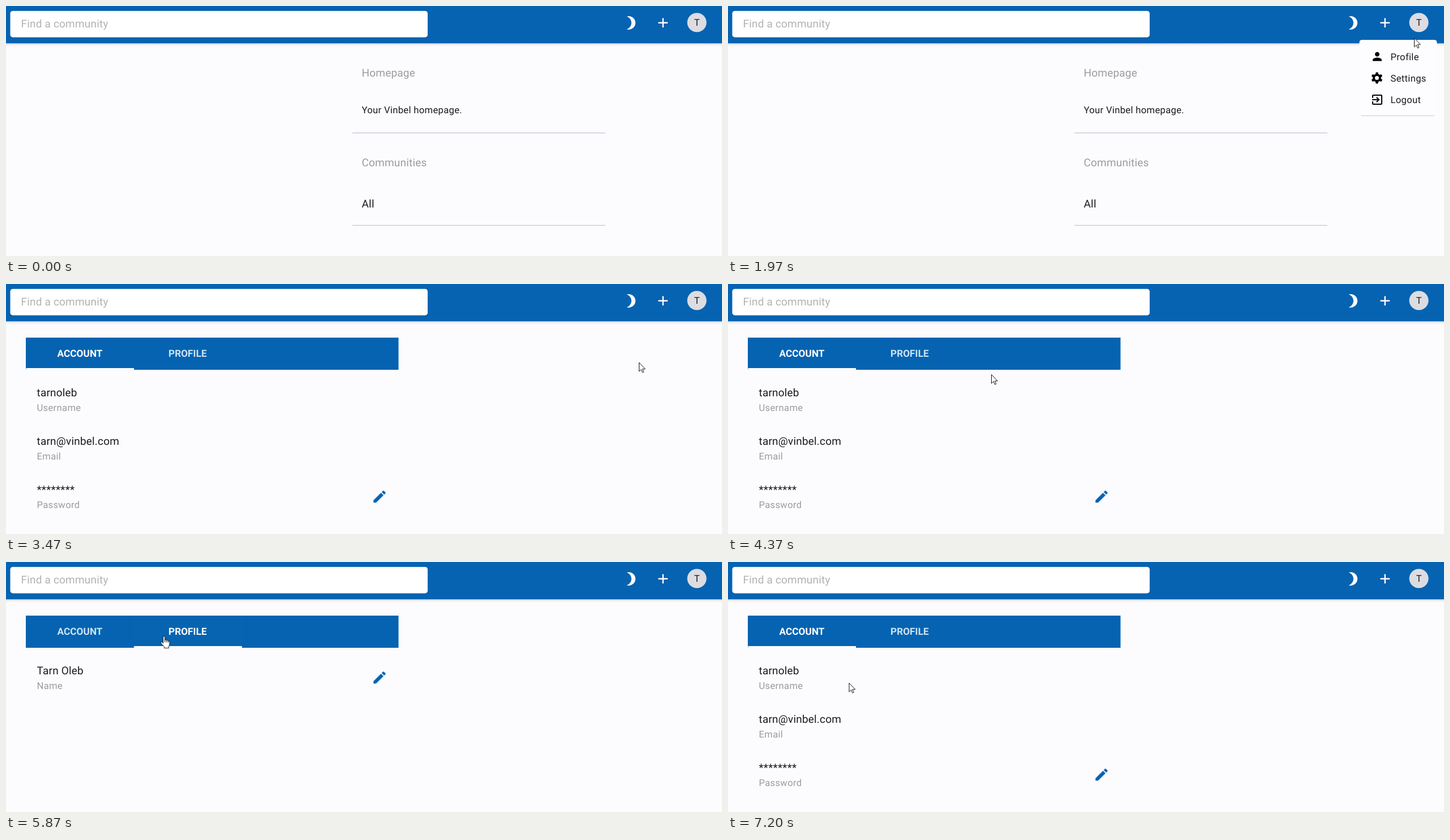
Write an HTML page that moves like this. It is 1265x443 px and loops after 7.23 s.

```html
<!DOCTYPE html>
<html lang="en">
<head>
<meta charset="utf-8">
<title>Account settings</title>
<style>
html, body { margin: 0; width: 100%; height: 100%; overflow: hidden; background: #fcfcff; }
svg { display: block; }
#stage { width: 1265px; height: 443px; }
text { font-family: Roboto, Arial, sans-serif; text-rendering: geometricPrecision; fill: #1c1c1c; }
.big { font-size: 19.05px; letter-spacing: .00938em; }
.small { font-size: 16.66px; letter-spacing: .01786em; }
.tab { font-size: 17.3px; font-weight: 600; fill: #fff; }
.dim { fill: #9c9c9a; }
.hint { fill: #b2b2ae; }
.off { fill: #cbe4f4; }
.blue { fill: #0563b1; }
.line { fill: #cbc9d8; }
.move { animation: 7230ms linear infinite; }
.step { animation: 7230ms step-end infinite; }

#home { animation-name: home; }
#settings { animation-name: settings; }
.account { animation-name: account; }
#profile { animation-name: profile; }
@keyframes home { 0% { visibility: visible } 43.15%, 100% { visibility: hidden } }
@keyframes settings { 0% { visibility: hidden } 43.15%, 100% { visibility: visible } }
@keyframes account {
  0% { visibility: hidden } 43.15% { visibility: visible }
  73.93% { visibility: hidden } 89.63%, 100% { visibility: visible }
}
@keyframes profile {
  0% { visibility: hidden } 73.93% { visibility: visible } 89.63%, 100% { visibility: hidden }
}

#menu { animation-name: menu; transform-origin: 1220px 60px; }
@keyframes menu {
  0%, 19.4% { opacity: 0; transform: scale(.75, .56); animation-timing-function: cubic-bezier(.4,0,.2,1) }
  22.6%, 43.14% { opacity: 1; transform: none }
  43.15%, 100% { opacity: 0; transform: none }
}

#bar { animation-name: bar; }
@keyframes bar {
  0%, 73.93% { transform: none; animation-timing-function: cubic-bezier(.4,0,.2,1) }
  78.08%, 89.95% { transform: translateX(190.7px); animation-timing-function: cubic-bezier(.4,0,.2,1) }
  94.1%, 100% { transform: none }
}

.ripple { fill: #fff; opacity: 0; }
#r1 { animation-name: grow1, fade1; transform-origin: 318px 130px; }
#r2 { animation-name: grow2, fade2; transform-origin: 170px 131px; }
@keyframes grow1 {
  0%, 73.3% { transform: scale(0); animation-timing-function: cubic-bezier(.4,0,.2,1) }
  80.9%, 100% { transform: none }
}
@keyframes fade1 {
  0%, 73.3% { opacity: .14 } 75.5% { opacity: .17 } 81.5%, 100% { opacity: 0 }
}
@keyframes grow2 {
  0%, 88.4% { transform: scale(0); animation-timing-function: cubic-bezier(.4,0,.2,1) }
  96%, 100% { transform: none }
}
@keyframes fade2 {
  0%, 88.4% { opacity: .14 } 90.6% { opacity: .17 } 97%, 100% { opacity: 0 }
}

#cursor { animation-name: path; animation-timing-function: ease-in-out; }
@keyframes path {
  0%, 2.5% { transform: translate(985px, 450px); animation-timing-function: ease-in }
  10.5% { transform: translate(1110px, 260px); animation-timing-function: ease-out }
  16.18% { transform: translate(1208px, 45px) }
  18.7%, 23.5% { transform: translate(1215px, 35px) }
  35.3%, 44.5% { transform: translate(1201px, 136px) }
  59.5%, 61.3% { transform: translate(465px, 160px) }
  71.2%, 77.5% { transform: translate(325px, 131px) }
  87.1%, 91.3% { transform: translate(177px, 132px) }
  98.9%, 100% { transform: translate(213.5px, 214px) }
}
#arrow { animation-name: arrow; }
#hand { animation-name: hand; }
@keyframes arrow {
  0% { visibility: visible } 15.4% { visibility: hidden }
  22% { visibility: visible } 28.5% { visibility: hidden }
  43.8% { visibility: visible } 66.5% { visibility: hidden }
  93.6%, 100% { visibility: visible }
}
@keyframes hand {
  0% { visibility: hidden } 15.4% { visibility: visible }
  22% { visibility: hidden } 28.5% { visibility: visible }
  43.8% { visibility: hidden } 66.5% { visibility: visible }
  93.6%, 100% { visibility: hidden }
}
</style>
</head>
<body>
<svg id="stage" viewBox="0 0 1265 443" xmlns="http://www.w3.org/2000/svg">
  <defs>
    <linearGradient id="shade" x1="0" y1="0" x2="0" y2="1">
      <stop offset="0" stop-color="#8088a8" stop-opacity=".5"/>
      <stop offset=".4" stop-color="#b0b0b8" stop-opacity=".2"/>
      <stop offset="1" stop-color="#c8c8c0" stop-opacity="0"/>
    </linearGradient>
    <clipPath id="tab1"><rect x="35" y="95" width="191" height="57"/></clipPath>
    <clipPath id="tab2"><rect x="226" y="95" width="191" height="57"/></clipPath>
    <path id="pen" d="M3 17.25V21h3.75L17.81 9.94l-3.75-3.75L3 17.25zM20.71 7.04c.39-.39.39-1.02 0-1.41l-2.34-2.34c-.39-.39-1.02-.39-1.41 0l-1.83 1.83 3.75 3.75 1.83-1.83z"/>
    <path id="tooth" d="M9.3 6L10 2.4q.1-.4.5-.4h3q.4 0 .5.4l.7 3.6z"/>
  </defs>

  <rect width="1265" height="443" fill="#fcfcff"/>

  <g id="home" class="step">
    <text class="big dim" x="628.5" y="125">Homepage</text>
    <text class="small" x="628.5" y="190">Your Vinbel homepage.</text>
    <rect class="line" x="612" y="224.2" width="447" height="1.4"/>
    <text class="big dim" x="628.5" y="284">Communities</text>
    <text class="big" x="628.5" y="356.5">All</text>
    <rect class="line" x="612" y="388" width="447" height="1.4"/>
  </g>

  <g id="settings" class="step">
    <rect class="blue" x="35" y="95" width="658.5" height="57"/>
    <g clip-path="url(#tab2)"><circle id="r1" class="ripple move" cx="318" cy="130" r="106"/></g>
    <g clip-path="url(#tab1)"><circle id="r2" class="ripple move" cx="170" cy="131" r="141"/></g>
    <rect id="bar" class="move" x="35.4" y="149" width="190.7" height="3" fill="#fff"/>
  </g>

  <g class="account step">
    <text class="tab" x="90.5" y="129">ACCOUNT</text>
    <text class="tab off" x="287" y="129">PROFILE</text>
    <text class="big" x="54.5" y="198.5">tarnoleb</text>
    <text class="small dim" x="54.5" y="224.5">Username</text>
    <text class="big" x="54.5" y="284.5">tarn@vinbel.com</text>
    <text class="small dim" x="54.5" y="310.5">Email</text>
    <text class="big" x="54.5" y="370.5">********</text>
    <text class="small dim" x="54.5" y="396.5">Password</text>
    <use href="#pen" class="blue" transform="translate(645.7 362.5) scale(1.19)"/>
  </g>

  <g id="profile" class="step">
    <text class="tab off" x="90.5" y="129">ACCOUNT</text>
    <text class="tab" x="287" y="129">PROFILE</text>
    <text class="big" x="54.5" y="198.5">Tarn Oleb</text>
    <text class="small dim" x="54.5" y="224.5">Name</text>
    <use href="#pen" class="blue" transform="translate(645.7 190.5) scale(1.19)"/>
  </g>

  <rect y="66" width="1265" height="6" fill="url(#shade)"/>
  <rect class="blue" width="1265" height="66"/>
  <rect x="7.5" y="8.8" width="737.5" height="46.6" rx="4.5" fill="#fff"/>
  <text class="big hint" x="26.5" y="38">Find a community</text>
  <g fill="#fff">
    <path transform="translate(1089.5 15.5) scale(1.19)" d="M9 2c-1.05 0-2.05.16-3 .46 4.06 1.27 7 5.06 7 9.54 0 4.48-2.94 8.27-7 9.54.95.3 1.95.46 3 .46 5.52 0 10-4.48 10-10S14.52 2 9 2z"/>
    <path transform="translate(1146.5 15.5) scale(1.19)" d="M19 13h-6v6h-2v-6H5v-2h6V5h2v6h6v2z"/>
  </g>
  <circle cx="1220.6" cy="29.3" r="17" fill="#dcdce2"/>
  <text x="1220.6" y="35.2" font-size="16.6" text-anchor="middle">T</text>

  <g id="menu" class="move">
    <path class="line" d="M1119 190h129v5h-129z"/>
    <rect x="1115.5" y="60" width="137" height="134" rx="4.5" fill="#fdfdff"/>
    <path transform="translate(1135 77.5)" d="M12 12c2.21 0 4-1.79 4-4s-1.79-4-4-4-4 1.79-4 4 1.79 4 4 4zm0 2c-2.67 0-8 1.34-8 4v2h16v-2c0-2.66-5.33-4-8-4z"/>
    <g transform="translate(1134.5 115.5)">
      <circle cx="12" cy="12" r="5.4" fill="none" stroke="#000" stroke-width="3.8"/>
      <use href="#tooth"/>
      <use href="#tooth" transform="rotate(60 12 12)"/>
      <use href="#tooth" transform="rotate(120 12 12)"/>
      <use href="#tooth" transform="rotate(180 12 12)"/>
      <use href="#tooth" transform="rotate(240 12 12)"/>
      <use href="#tooth" transform="rotate(300 12 12)"/>
    </g>
    <path transform="translate(1135 154)" d="M10.09 15.59L11.5 17l5-5-5-5-1.41 1.41L12.67 11H3v2h9.67l-2.58 2.59zM19 3H5c-1.11 0-2 .9-2 2v4h2V5h14v14H5v-4H3v4c0 1.1.89 2 2 2h14c1.1 0 2-.9 2-2V5c0-1.1-.9-2-2-2z"/>
    <text class="small" x="1170.5" y="95.5">Profile</text>
    <text class="small" x="1170.5" y="133.8">Settings</text>
    <text class="small" x="1170.5" y="172">Logout</text>
  </g>

  <g id="cursor" class="move" fill="#fff" stroke="#111" stroke-linejoin="round">
    <path id="arrow" class="step" d="M.5.5v15.6l3.6-3.4 2.4 5.4 2.3-1-2.4-5.3h4.9z"/>
    <g id="hand" class="step">
      <path d="M-1.6 12.5V1.8Q-1.6.3 0 .3T1.6 1.8V7Q4 5.9 4.6 7.6 6.9 6.7 7.4 8.5 9.9 7.9 9.9 10.4V14Q9.9 16.5 8.4 18.2V21.2H.4V19Q-2.8 15.8-5.6 12.2-6.5 10.6-5 10.1-3.5 9.8-1.6 12.5z"/>
      <path d="M1.6 7v4M4.6 7.6v3.6M7.4 8.5v3" fill="none"/>
    </g>
  </g>
</svg>
</body>
</html>
```
